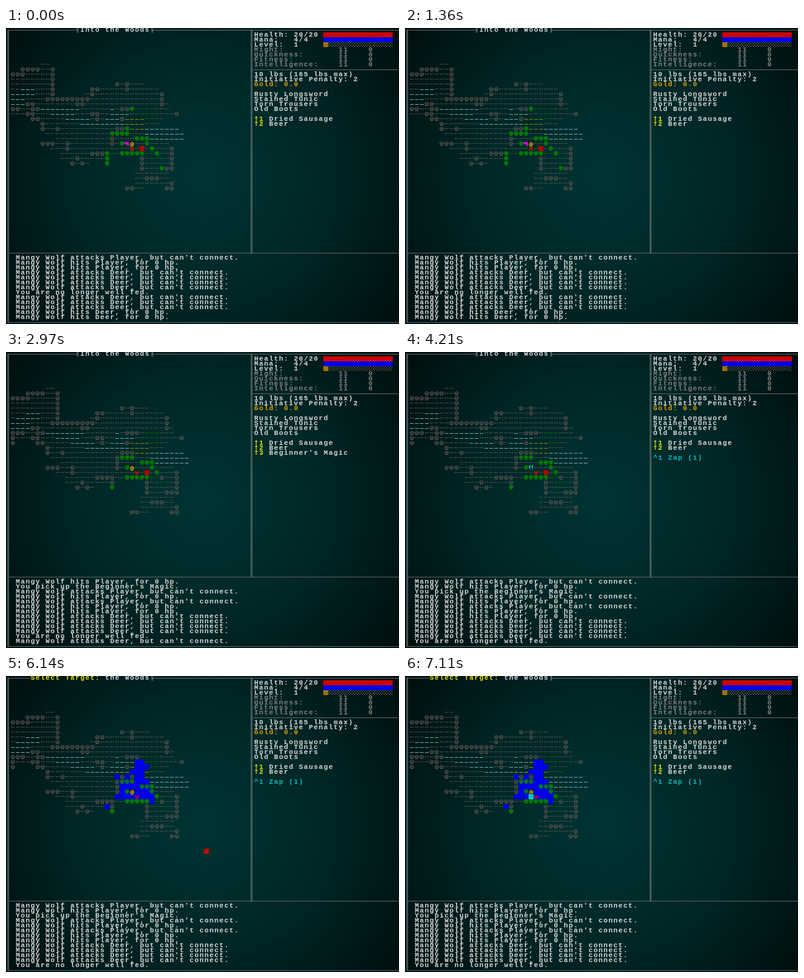
Animation, 633 px wide and 478 px high, one loop 8 s. Source, as an HTML page with a canvas:

```html
<!DOCTYPE html>
<html>
<head>
<meta charset="utf-8">
<style>
html, body { margin: 0; width: 100%; height: 100%; overflow: hidden; background: #001414; }
canvas { display: block; }
</style>
</head>
<body>
<canvas id="stage" width="633" height="478"></canvas>
<script>
const ctx = document.getElementById('stage').getContext('2d');
const LOOP = 8000;
const FONT = 'bold 11px "Liberation Mono", monospace';
const WHITE = '#d8d8d8', GRAY = '#808080', DIM = '#5c5450', GREEN = '#007800', OLIVE = '#8c8c00',
      RED = '#d00000', BLUE = '#0000e6', CYAN = '#00d2d2', YELLOW = '#e6e600', GOLD = '#dca000';

// o T tree, - g grass, ~ river, y path; E e are seen only before the step west
const MAP_TOP = 7;
const MAP = [
  '       --',
  '   oooo--o',
  'oooo-----o',
  '---------o',
  '---------o            o-o---',
  '---~~~---o       oo-----o------',
  '-~~~~~---o      -o-------------o',
  '~~~~----ooooooooo--------------o',
  '~~~~oo--------oo---------------o-',
  'ooo--oo~~~~~~~~------~-ooEeggg---',
  'o---oo---~~~~~---oo--~~~~--ggg----o',
  'o    oo-----~~~~~-o-~~~oyyyygg--',
  '       o-------~~~~~~~~~yyyy---',
  '       o--o-----------ooEyyy~~~~~~~',
  '        -------------ETTT---~~~~~~~~',
  '          -----------o----TTT~~~~~~~',
  '       ooo--o--------o-T----T----',
  '         ---o----------------T---o',
  '           ------oooEeeTTTTTggE--o',
  '           ---o-----E      o-ggg-o',
  '             o-o-   T      o-----o',
  '                           o---Eoo',
  '                          -------',
  '                          --ooo--',
  '                          -------o',
  '                        oo--    oo'
];

// row, first column, last column of the spell's reach
const REACH = [[17, 26, 27], [18, 26, 28], [19, 25, 27], [20, 22, 22], [20, 24, 24], [20, 26, 27],
  [21, 23, 28], [22, 23, 28], [23, 23, 29], [24, 22, 29], [25, 29, 29], [26, 20, 20]];

const fight = (act, who) => 'Mangy Wolf ' +
  (act === 'a' ? `attacks ${who}, but can't connect.` : `hits ${who}, for 0 hp.`);
const FED = 'You are no longer well fed.';
const PICK = "You pick up the Beginner's Magic.";
const LOG = [...'ahpahahhAAAAfAAAHH'].map(c => c === 'p' ? PICK : c === 'f' ? FED :
  fight(c.toLowerCase(), c < 'a' ? 'Deer' : 'Player'));

const px = cell => cell * 8 - 1;

function rect(x, y, w, h, color) {
  ctx.fillStyle = color;
  ctx.fillRect(x, y, w, h);
}

function cell(col, row, color, cols = 1) {
  rect(px(col), px(row), cols * 8, 8, color);
}

function text(str, col, row, color = WHITE, font = FONT) {
  ctx.font = font;
  ctx.fillStyle = color;
  [...str].forEach((ch, i) => ctx.fillText(ch, px(col + i) + 4, px(row) + 7));
}

function dots(col, row, cols, dx, color) {
  ctx.fillStyle = color;
  for (let y = 0; y < 8; y += 2)
    for (let x = y / 2 % 2 * dx / 2; x < cols * 8; x += dx)
      ctx.fillRect(px(col) + x, px(row) + y, 1, 1);
}

function hline(x0, x1, y) { rect(x0, y, x1 - x0, 1, '#5c6666'); }

function vline(x, y0, y1) {
  for (let y = y0; y < y1; y += 2) rect(x - 1, y, 3, 1, '#869090');
}

function tree(col, row, green) {
  const x = px(col), y = px(row);
  if (green) {
    ctx.fillStyle = GREEN;
    ctx.beginPath();
    ctx.ellipse(x + 4, y + 3, 3.6, 3, 0, 0, 7);
    ctx.fill();
    rect(x + 3, y + 5, 2, 2, GREEN);
    rect(x + 2, y + 6, 4, 1, GREEN);
  } else {
    ctx.strokeStyle = DIM;
    ctx.beginPath();
    ctx.ellipse(x + 4, y + 3.5, 3, 2.5, 0, 0, 7);
    ctx.stroke();
    rect(x + 1, y + 3, 6, 1, DIM);
    rect(x + 2, y + 6, 4, 1, DIM);
  }
}

function tile(kind, col, row, early) {
  const green = kind === 'T' || kind === 'g' || early && /e/i.test(kind);
  const x = px(col), y = px(row);
  if (/[oTE]/.test(kind)) tree(col, row, green);
  else if (/[~y]/.test(kind)) rect(x + 1, y + 4, 6, 1, kind === 'y' ? OLIVE : '#6cacac');
  else if (kind !== ' ') {
    const color = green ? GREEN : DIM;
    rect(x + 1, y + 3, 3, 1, color);
    rect(x + 5, y + 3, 2, 1, color);
  }
}

function drawMap(early, only = /./) {
  MAP.forEach((line, r) => [...line].forEach((kind, i) => {
    const col = i + 1 - early;
    if (col > 0 && only.test(kind)) tile(kind, col, r + MAP_TOP, early);
  }));
}

function background() {
  const g = ctx.createRadialGradient(316, 239, 0, 316, 239, 400);
  g.addColorStop(0, '#003434');
  g.addColorStop(.5, '#002626');
  g.addColorStop(1, '#000e0e');
  rect(0, 0, 633, 478, g);
}

function frame(aiming) {
  hline(3, aiming ? 39 : 115, 3);
  hline(236, 633, 3);
  hline(395, 633, 67);
  hline(3, 633, 363);
  hline(3, 633, 475);
  vline(3, 3, 476);
  vline(395, 3, 364);
  vline(235, 0, 7);
  text('Into the Woods', 15, 0);
  if (aiming) {
    rect(39, 0, 112, 7, '#001616');
    text('Select Target:', 5, 0, YELLOW);
  } else vline(115, 0, 7);
}

function panel(t) {
  text('Health: 20/20', 50, 1);
  text('Mana:   4/4', 50, 2);
  text('Level:  1', 50, 3);
  ['Might:', 'Quickness:', 'Fitness:', 'Intelligence:'].forEach((name, i) => {
    text(name, 50, 4 + i, GRAY);
    text('11', 67, 4 + i, GRAY);
    text('0', 73, 4 + i, GRAY);
  });
  cell(64, 1, '#dc0000', 14);
  dots(64, 1, 14, 4, '#700808');
  cell(64, 2, BLUE, 14);
  dots(65, 3, 13, 4, '#c0b070');
  cell(64, 3, '#7c5c00');
  dots(64, 3, 1, 2, '#f0b400');

  text('10 lbs (165 lbs max)', 50, 9);
  text('Initiative Penalty: 2', 50, 10);
  text('Gold: 0.0', 50, 11, GOLD);
  ['Rusty Longsword', 'Stained Tunic', 'Torn Trousers', 'Old Boots']
    .forEach((name, i) => text(name, 50, 13 + i));
  const pack = ['Dried Sausage', 'Beer'];
  if (t >= 2740 && t < 4210) pack.push("Beginner's Magic");
  pack.forEach((name, i) => {
    text('↑', 50, 18 + i, YELLOW, 'bold 10px "DejaVu Sans", sans-serif');
    text(String(i + 1), 51, 18 + i, YELLOW);
    text(name, 53, 18 + i);
  });
  if (t >= 4210) text('^1 Zap (1)', 50, 21, '#00bebe');
}

function tooltip(col, row, lines) {
  const x = px(col), y = px(row), h = (lines.length + 2) * 8;
  rect(x, y, 152, h, '#001818');
  ctx.strokeStyle = GRAY;
  ctx.strokeRect(x + 3.5, y + 3.5, 136, h - 8);
  lines.forEach((line, i) => text(line, col + 1, row + 1 + i));
  text('►', col + 18, row + (lines.length + 1) / 2, GRAY);
}

function player(struck) {
  if (struck) {
    for (const x of [200, 204]) {
      rect(x, 183, 2, 4, CYAN);
      rect(x, 188, 2, 1, CYAN);
    }
  } else {
    cell(25, 23, '#000');
    text('@', 25, 23, '#ffff28', 'bold 8px "DejaVu Sans", sans-serif');
  }
}

function creatures(t, early) {
  text('w', 26 - early, 24, '#f00000');
  if (t < 5530) {
    cell(28 - early, 24, '#a80000');
    dots(28 - early, 24, 1, 4, '#e00000');
  }
  if (early) {
    rect(191, 184, 7, 4, '#d200d2');
    rect(195, 184, 3, 6, '#d200d2');
  }
  player([2280, 2740, 4210].some(s => t >= s && t < s + 230));
}

function cursor(t) {
  const step = t < 5910 ? 0 : Math.min(9, 1 + Math.floor((t - 5910) / 75));
  let col = Math.round(51 - 25 * step / 9), row = 43 - 2 * step;
  if (t >= 6970) [col, row] = [t < 7110 ? 26 : 25, 24];
  cell(col, row, step < 9 ? RED : CYAN);
  if (step === 9 && t < 6970) tree(col, row, true);
  else if (step === 9 && t < 7110) text('w', col, row, RED);
  else if (step === 9) rect(px(col) + 1, px(row) + 3, 6, 1, '#007878');
}

function draw(t) {
  const early = t < 2280 ? 1 : 0, aiming = t >= 5530;
  ctx.textAlign = 'center';
  ctx.lineWidth = 1;
  background();
  frame(aiming);
  panel(t);
  drawMap(early);
  if (aiming) {
    REACH.forEach(([row, a, b]) => cell(a, row, BLUE, b - a + 1));
    drawMap(0, /T/);
  }
  creatures(t, early);
  const skip = t < 2280 ? 5 : t < 2740 ? 3 : t < 4210 ? 1 : 0;
  LOG.slice(skip, skip + 13).forEach((line, i) => text(line, 2, 46 + i));
  if (t >= 500 && t < 1360) tooltip(5, 22, ["Beginner's Magic"]);
  if (aiming) cursor(t);
  if (t >= 6970 && t < 7110) tooltip(7, 22, ['Mangy Wolf', 'Slightly wounded', 'Hunting you']);
}

const start = performance.now();
function tick() {
  draw((performance.now() - start) % LOOP);
  requestAnimationFrame(tick);
}
tick();
</script>
</body>
</html>
```
